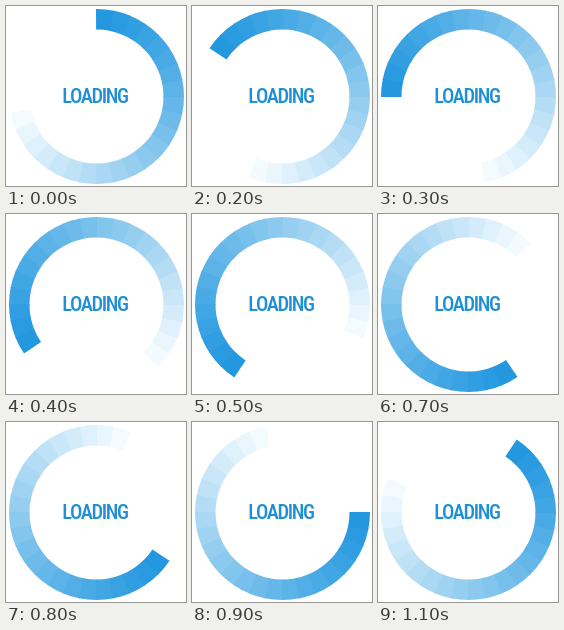
These frames come from a looping animation (180x180 px, 1200 ms). An HTML page:

```html
<!DOCTYPE html>
<html lang="en">
<head>
<meta charset="utf-8">
<title>Loading</title>
<style>
  html, body { margin: 0; width: 100%; height: 100%; overflow: hidden; background: #fff; }
  svg { display: block; width: 100vw; height: 100vh; }
  text {
    font: 500 20.5px "Roboto Condensed", "Noto Sans", "Open Sans", sans-serif;
    font-stretch: 62.5%;
    letter-spacing: -1.4px;
    fill: #1f90d6;
    text-anchor: middle;
  }
</style>
</head>
<body>
<svg viewBox="0 0 180 180">
  <g id="ring"></g>
  <text x="89" y="97">LOADING</text>
</svg>
<script>
  const LOOP = 1200, STEPS = 12, SLOTS = 32, VISIBLE = 23;
  const CENTER = 90.5, OUTER = 87.5, INNER = 67;
  const HEAD = [36, 152, 223], TAIL = [244, 251, 255];
  const OVERLAP = 0.03;
  const ring = document.getElementById('ring');

  const point = (radius, slot) => {
    const angle = slot / SLOTS * 2 * Math.PI;
    return `${CENTER + radius * Math.sin(angle)} ${CENTER - radius * Math.cos(angle)}`;
  };

  const shade = i => {
    const t = (i / (VISIBLE - 1)) ** 1.15;
    return `rgb(${HEAD.map((c, k) => Math.round(c + (TAIL[k] - c) * t))})`;
  };

  // Segments overlap slightly to hide seams; darker ones lie on top.
  for (let i = VISIBLE - 1; i >= 0; i--) {
    const start = i - OVERLAP, end = i + 1 + OVERLAP;
    const path = document.createElementNS('http://www.w3.org/2000/svg', 'path');
    path.setAttribute('d', `M${point(OUTER, start)}A${OUTER} ${OUTER} 0 0 1 ${point(OUTER, end)}` +
      `L${point(INNER, end)}A${INNER} ${INNER} 0 0 0 ${point(INNER, start)}Z`);
    path.setAttribute('fill', shade(i));
    ring.append(path);
  }

  function draw(time) {
    const step = Math.floor(time % LOOP / LOOP * STEPS);
    const slot = Math.round(step * SLOTS / STEPS);
    ring.setAttribute('transform', `rotate(${-slot * 360 / SLOTS} ${CENTER} ${CENTER})`);
  }

  function tick() {
    draw(performance.now());
    requestAnimationFrame(tick);
  }
  tick();
</script>
</body>
</html>
```
